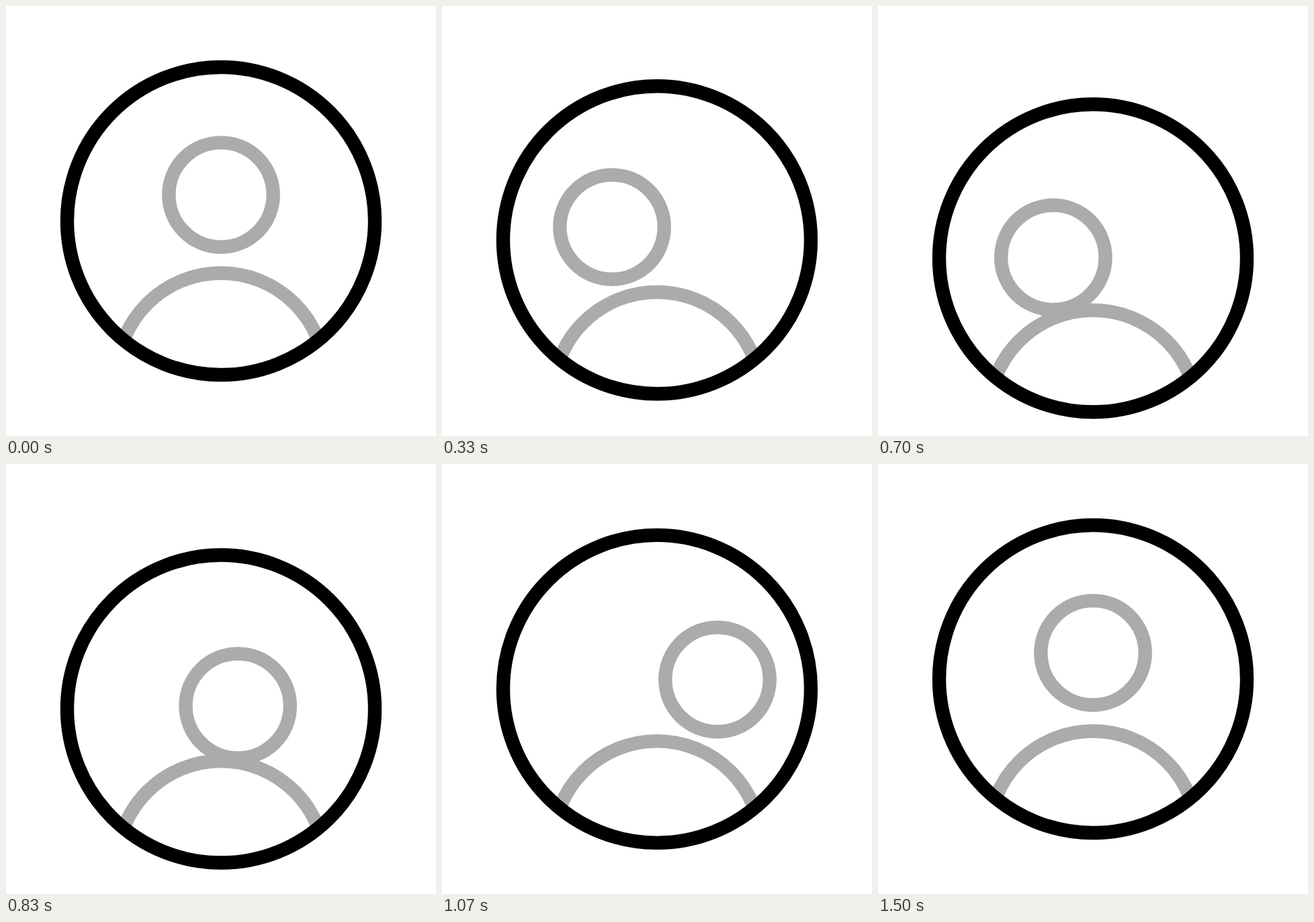
Recreate the animation shown at these times as an HTML page. Size 640 by 640 pixels, loop 2000 ms.

```html
<!DOCTYPE html>
<html lang="en">
<head>
<meta charset="utf-8">
<title>Avatar</title>
<style>
  html, body { margin: 0; width: 100%; height: 100%; overflow: hidden; background: #fff; }
  svg { display: block; width: 100%; height: 100%; }
  circle { fill: none; stroke-width: 20.4; }
</style>
</head>
<body>
<svg viewBox="0 0 640 640">
  <defs>
    <clipPath id="inside"><circle cx="320" cy="320" r="229"/></clipPath>
  </defs>
  <g id="badge">
    <g clip-path="url(#inside)">
      <circle cx="320" cy="552.5" r="155" stroke="#ababab"/>
    </g>
    <circle cx="320" cy="320" r="229" stroke="#000"/>
  </g>
  <circle id="head" cx="320" cy="281.1" r="77.7" stroke="#ababab"/>
</svg>
<script>
const LOOP = 2000, FPS = 30;
const badge = document.getElementById('badge');
const head = document.getElementById('head');

// Smooth 0 to 1 between frames a and b
function ease(a, b, f) {
  const u = Math.min(1, Math.max(0, (f - a) / (b - a)));
  return u * u * (3 - 2 * u);
}

// Sink from rest, then return to it
const dip = (f, low, start, end) => Math.min(ease(0, low, f), 1 - ease(start, end, f));

function swing(f) {
  const left = -104.4, right = 93.3;
  return left * ease(0, 16.8, f)
    + (right - left) * ease(16.8, 30.35, f)
    - right * ease(30.35, 45, f);
}

const move = (el, x, y) =>
  el.setAttribute('transform', `translate(${x.toFixed(2)} ${y.toFixed(2)})`);

function draw(ms) {
  const f = Math.floor((ms % LOOP + 3.5) * FPS / 1000);
  move(badge, 0, 56.5 * dip(f, 20, 19.35, 38.4));
  move(head, swing(f), 96 * dip(f, 20, 18.5, 42.7));
}

const start = performance.now();
function tick() {
  draw(performance.now() - start);
  requestAnimationFrame(tick);
}
tick();
</script>
</body>
</html>
```
